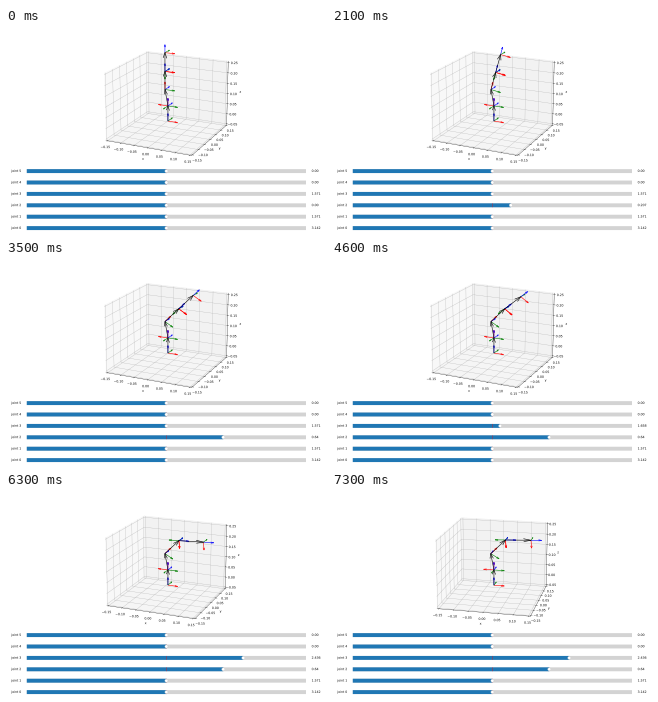
These frames come from a looping animation (320x204 px, 8000 ms). A matplotlib script:

```python
import numpy as np
import matplotlib.pyplot as plt
from matplotlib.animation import FuncAnimation
from matplotlib.patches import Rectangle
from matplotlib.patheffects import Normal

W, H, DPI = 320, 204, 24
STEP, FRAMES = 100, 80

plt.rcParams.update({
    "font.family": "DejaVu Sans",
    "font.size": 9.4,
    "text.hinting": "none",
    "path.snap": False,
    "path.effects": [Normal()],  # draws the tiny text as smooth outlines
    "axes3d.automargin": True,
    "toolbar": "None",
})

fig = plt.figure(figsize=(W / DPI, H / DPI), dpi=DPI, facecolor="white")

# 3D view
SIDE = 143
ax = fig.add_axes([88.5 / W, 58.3 / H, SIDE / W, SIDE / H], projection="3d")
ax.computed_zorder = False
ax.set(xlim=(-0.15, 0.15), ylim=(-0.15, 0.15), zlim=(-0.05, 0.25),
       xlabel="x", ylabel="y", zlabel="z")

# Slider panel, in pixels from the top left
panel = fig.add_axes([0, 0, 1, 1])
panel.set(xlim=(0, W), ylim=(H, 0))
panel.axis("off")

LEFT, RIGHT, BAR = 20.8, 300.0, 3.9
MID, HALF = (LEFT + RIGHT) / 2, (RIGHT - LEFT) / 2
PAD = 0.04 * HALF
QUARTER = np.pi / 2


class JointSlider:
    """A slider that starts in the middle and reaches a quarter turn each way."""

    def __init__(self, index, start):
        self.start = start
        y = 200.1 - 11.4 * index
        top = y - BAR / 2
        panel.add_patch(Rectangle((LEFT, top), 2 * HALF, BAR, fc="lightgrey", lw=0))
        self.fill = panel.add_patch(Rectangle((LEFT, top), HALF, BAR, fc="C0", lw=0))
        panel.plot([MID, MID], [top, top + BAR], color="r", lw=1,
                   solid_capstyle="butt")
        self.knob, = panel.plot([MID], [y], "o", ms=9.3, mfc="white",
                                mec="0.75", mew=0.9)
        panel.text(LEFT - PAD, y, f"joint {index}", ha="right", va="center")
        self.text = panel.text(RIGHT + PAD, y, "", ha="left", va="center")

    def show(self, value):
        x = MID + HALF * (value - self.start) / QUARTER
        self.fill.set_width(x - LEFT)
        self.knob.set_xdata([x])
        label = f"{value:.3f}"
        self.text.set_text(label[:-1] if label.endswith("0") else label)


START = [np.pi, QUARTER, 0, QUARTER, 0, 0]
sliders = [JointSlider(i, start) for i, start in enumerate(START)]


def shoulder_angle(t):
    return np.interp(t, [1200, 2100, 2900, 3500], [0, 0.207, 0.468, 0.64])


def elbow_angle(t):
    return np.interp(t, [4000, 4600, 5300, 6000], [QUARTER, 1.658, 2.042, 2.436])


def orbit(t):
    u = np.clip((t - 6200) / 800, 0, 1)
    return 1 - (1 - u) ** 2


# Arm
X, Y, Z = np.eye(3)
BASE = np.zeros(3)
HIP = 0.073 * Z
SHOULDER = 0.149 * Z - 0.011 * X
UPPER, FORE, AXIS = 0.085, 0.087, 0.036


def lean(angle):
    """Directions along and across a link leaning towards +x."""
    c, s = np.cos(angle), np.sin(angle)
    return s * X + c * Z, c * X - s * Z


def arm(q2, q3):
    """Joint positions, and an (origin, x, y, z) frame for each axis."""
    upper, across = lean(q2)
    fore, side = lean(q2 + q3 - QUARTER)
    elbow = SHOULDER + UPPER * upper
    tip = elbow + FORE * fore
    frames = [
        (BASE, X, Y, Z),
        (HIP, Z, X, Y),
        (HIP, -X, -Y, Z),
        (SHOULDER, upper, across, Y),
        (elbow, side, -fore, Y),
        (elbow, side, Y, fore),
        (tip, side, Y, fore),
    ]
    return np.array([BASE, HIP, SHOULDER, elbow, tip]), np.array(frames)


arrows = []


def add_arrows(starts, vectors, color, zorder):
    arrows.append(ax.quiver(*starts.T, *vectors.T, color=color, lw=1.7,
                            arrow_length_ratio=0.3, zorder=zorder))


def update(i):
    t = i * STEP
    q2, q3 = shoulder_angle(t), elbow_angle(t)
    for slider, value in zip(sliders, START[:2] + [q2, q3] + START[4:]):
        slider.show(value)

    while arrows:
        arrows.pop().remove()
    joints, frames = arm(q2, q3)
    for k, color in enumerate(["red", "green", "blue"], start=1):
        add_arrows(frames[:, 0], AXIS * frames[:, k], color, k)
    add_arrows(joints[:-1], np.diff(joints, axis=0), "black", 4)

    turn = orbit(t)
    ax.view_init(elev=18.2 - 1.2 * turn, azim=-65 - 12 * turn)
    return arrows


anim = FuncAnimation(fig, update, frames=FRAMES, interval=STEP,
                     repeat=True, repeat_delay=0, blit=False)
plt.show()
```
